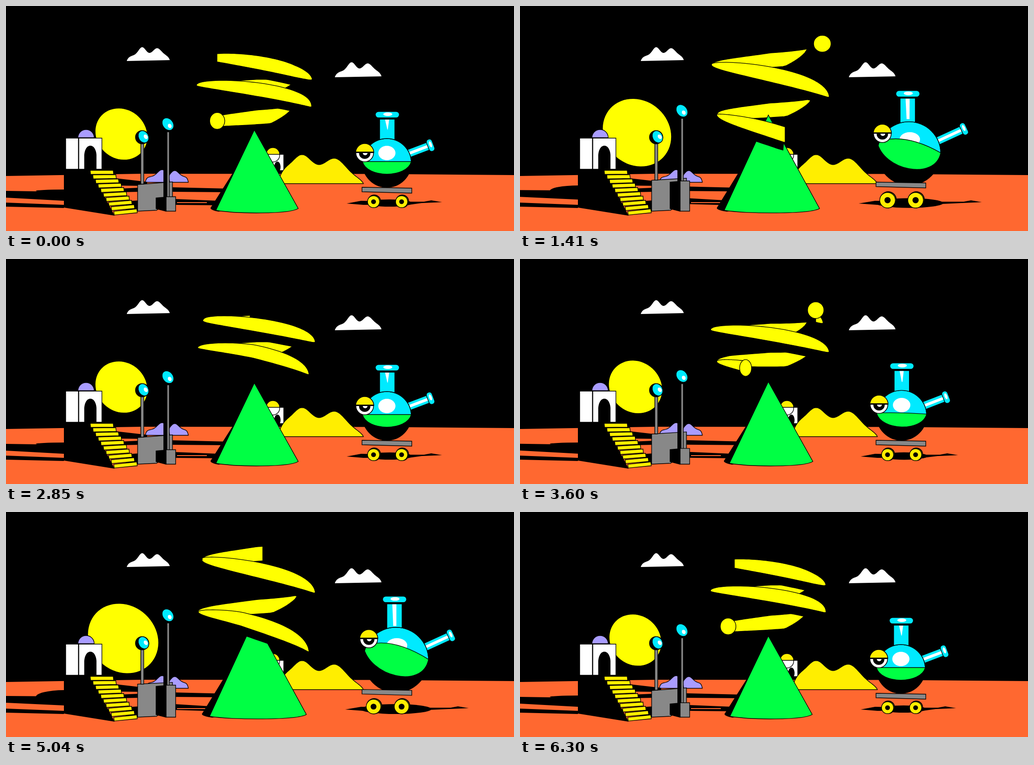
An HTML page with a canvas that plays this animation: 1123 px wide and 499 px high, repeating every 6.33 s.

```html
<!DOCTYPE html>
<html lang="en">
<head>
<meta charset="utf-8">
<title>Desert toys</title>
<style>
html, body { margin: 0; width: 100%; height: 100%; overflow: hidden; background: #000; }
canvas { display: block; }
</style>
</head>
<body>
<canvas id="stage" width="1123" height="499"></canvas>
<script>
const ctx = document.getElementById('stage').getContext('2d');
const LOOP = 6330;
const SUN = '#ffff00', GOLD = '#ffee00', CYAN = '#00eaff', GREEN = '#00ff44';
const ORANGE = '#ff6830', LILAC = '#a99cff', GREY = '#888', WHITE = '#fff', BLACK = '#000';

const clamp = (v, a = 0, b = 1) => Math.min(b, Math.max(a, v));
const rad = d => d * Math.PI / 180;
const gauss = (x, c, w) => Math.exp(-((x - c) ** 2) / (2 * w * w));
const ease = (t, a, b) => {
  const u = clamp((t - a) / (b - a));
  return u * u * (3 - 2 * u);
};
// Rises from a to b, holds until c, falls until d
const swing = (t, a, b, c, d) => ease(t, a, b) * (1 - ease(t, c, d));

function pose(t) {
  const s = .7 * swing(t, 0, 320, 380, 760) + swing(t, 450, 1650, 1700, 2250) + swing(t, 3400, 4600, 5060, 6130);
  const wheel = swing(t, 300, 700, 800, 2100) + .4 * swing(t, 4100, 5040, 5100, 6000);
  const hop = swing(t, 400, 750, 800, 1700) + swing(t, 3400, 4100, 4180, 5640);
  return {
    s, wheel, hop,
    angle: 43 - 1080 * t / LOOP + 30 * gauss(t, 1410, 260),
    cx: 842 + 20 * s,
    cy: 348 - 17 * s - 20 * wheel * wheel,
    reach: clamp(s + wheel) + .8 * gauss(t, 380, 110)
  };
}

function paint(fill, line = 1.4) {
  ctx.fillStyle = fill;
  ctx.fill();
  if (line) {
    ctx.strokeStyle = BLACK;
    ctx.lineWidth = line;
    ctx.stroke();
  }
}

function poly(fill, pts, line) {
  ctx.beginPath();
  pts.forEach(([x, y]) => ctx.lineTo(x, y));
  ctx.closePath();
  paint(fill, line);
}

function box(fill, x, y, w, h, line) {
  ctx.beginPath();
  ctx.rect(x, y, w, h);
  paint(fill, line);
}

function oval(fill, x, y, rx, ry = rx, turn = 0, line) {
  ctx.beginPath();
  ctx.ellipse(x, y, rx, ry, turn, 0, Math.PI * 2);
  paint(fill, line);
}

function dome(fill, x, y, r, line) {
  ctx.beginPath();
  ctx.arc(x, y, r, Math.PI, 0);
  ctx.closePath();
  paint(fill, line);
}

// A flat-bottomed mound with rounded ends and some peaks [centre, spread, height]
function mound(fill, x, y, w, flat, peaks, line, rise = 0) {
  const pts = [];
  for (let i = 0; i <= 80; i++) {
    const u = -Math.cos(Math.PI * i / 80), px = (u + 1) / 2 * w;
    const edge = 1 - u ** 8;
    const h = peaks.reduce((sum, [c, spread, tall]) => sum + tall * gauss(px, c, spread), flat);
    pts.push([x + px, y - rise * px / w - h * edge ** .8]);
  }
  poly(fill, pts, line);
}

function cloud(x, y, w) {
  const k = w / 95;
  mound(WHITE, x, y, w, 12 * k, [[34 * k, 8 * k, 18 * k], [67 * k, 9 * k, 15 * k]], 0, 2);
}

function backdrop({ s }) {
  ctx.fillStyle = BLACK;
  ctx.fillRect(0, 0, 1123, 499);
  poly(ORANGE, [[0, 377], [300, 372], [820, 372.5], [1123, 375], [1123, 499], [0, 499]], 0);
  cloud(267, 122, 95);
  cloud(727, 158, 103);
  oval(SUN, 255 + 4 * s, 284 - 3.5 * s, 60 + 22 * s, 54 + 18.5 * s, .75, 0);

  box(WHITE, 578, 329, 36, 36);
  oval(BLACK, 600, 357, 7, 12, 0, 0);
  oval(WHITE, 590, 331, 15);
  dome(GOLD, 590, 329, 15);
  mound(GOLD, 600, 394, 190, 14, [[10, 14, 16], [54, 23, 50], [126, 24, 42]]);
  mound(LILAC, 356, 391, 47, 12, [[17, 9, 14]]);
  mound(LILAC, 308, 391, 54, 12, [[37, 10, 16]]);
}

function groundShadows({ s }) {
  const band = (x0, y0, x1, y1, h0, h1) =>
    poly(BLACK, [[x0, y0], [x1, y1], [x1, y1 + h1], [x0, y0 + h0]], 0);
  band(0, 410 - 2 * s, 128, 412 - 3 * s, 15, 20);
  band(0, 436, 128, 441, 9, 7);
  oval(BLACK, 128, 410, 62, 3 + 30 * Math.max(0, s - .6), 0, 0);
  band(225, 380, 312, 390, 18, 9);
  band(250, 405, 295, 403, 8, 9);
  band(265, 433, 295, 431, 20, 24);
  band(366, 402 - 2 * s, 490, 405 - 2 * s, 10, 8);
  band(372, 428 - 2 * s, 470, 432, 13, 10);
  ctx.fillStyle = ORANGE;
  ctx.fillRect(378, 435, 66, 2);
}

function temple() {
  dome(LILAC, 177, 292, 18);
  poly(BLACK, [[128, 361], [186, 361], [240, 465], [128, 447]], 0);
  box(WHITE, 132, 293, 28, 69);
  box(WHITE, 161, 293, 51, 69);
  ctx.beginPath();
  ctx.moveTo(173, 362);
  ctx.lineTo(173, 330);
  ctx.bezierCurveTo(175, 303, 198, 303, 200, 330);
  ctx.lineTo(200, 362);
  paint(BLACK, 0);
  for (let i = 0; i < 10; i++) {
    const x = 186 + i * 5.8, y = 364.5 + i * 9.8, lean = i * .3;
    poly(GOLD, [[x, y + lean], [x + 51, y - lean], [x + 52, y + 8.5 - lean], [x + 1, y + 9 + lean * .7]]);
  }
}

function lamps({ s, hop }) {
  const b = 393 - 36 * hop, tilt = 3 * (1 - clamp(hop));
  const t = 423 - 39 * s, y = 262 - 33 * s;
  poly(GREY, [[291, b + tilt], [368, b - tilt], [368, 424], [333, 453], [291, 455]]);
  box(BLACK, 348, Math.min(b, 363), 13, 80, 0);
  box(GREY, 298, 304, 6.5, b - 302);
  oval(BLACK, 301, 291, 15.5, 15.5, 0, 0);
  oval(CYAN, 304, 290, 11, 14, -.5);
  oval(WHITE, 309, 290, 4, 5.5, -.6, 0);

  box(GREY, 356, y + 17, 5, t - y - 16);
  oval(CYAN, 358, y, 11.5, 15, -.65);
  oval(WHITE, 362, y + 4, 4, 5, -.5, 0);
  box(GREY, 354, t, 21, 455 - t);
  poly(BLACK, [[331, t + 2], [354, t], [354, 456], [331, 450]], 0);
}

function makeCoil({ s, angle }) {
  const first = ((angle + 1260) % 360) - 180;
  const last = first + 634;
  const top = 123 - 50 * s, pitch = 60 + 57 * s;

  const point = a => {
    const u = a - first, sin = Math.sin(rad(a)), cos = Math.cos(rad(a));
    const size = 132 - Math.min(14, 14 * ((u - 305) / 211) ** 4);
    const y = top + pitch * u / 360 + 10 * (1 - cos) - 12 * sin - 4 * Math.abs(sin);
    return [553 - size * cos, y + 14 * clamp((u - 530) / 100)];
  };

  // Lit edges of the tube at angle a, q degrees into its half turn
  const edges = (a, q, front) => {
    const [x, y] = point(a);
    if (front) {
      const h = (15.5 + 2 * s) * Math.max(0, Math.sin(Math.PI * clamp(q / 172) ** 1.4)) ** .65;
      return [x, y - h, y + h];
    }
    const up = y - 16 * clamp((180 - q) / 90);
    const low = y + 16 * Math.sqrt(clamp((180 - q) / 35));
    return [x, up, up + (low - up) * clamp((q - 46) / 28) ** .7];
  };

  const strand = (base, front) => {
    const a0 = Math.max(first, base + (front ? 0 : 46));
    const a1 = Math.min(last, base + (front ? 172 : 180));
    if (a1 <= a0) return;
    const up = [], low = [], dark = [], n = 40;
    for (let i = 0; i <= n; i++) {
      const a = a0 + (a1 - a0) * i / n, q = a - base;
      const [x, y, z] = edges(a, q, front);
      up.push([x, y]);
      low.unshift([x, z]);
      dark.unshift([x - 4, z + 18 * clamp(q / 15) * clamp((180 - q) / 30)]);
    }
    if (front) poly(BLACK, up.concat(dark), 0);
    poly(SUN, up.concat(low), 1.3);
  };

  const cap = (a, side, lift, front) => {
    const c = Math.cos(rad(a)) * side;
    if (c < .35 || (Math.sin(rad(a)) > 0) !== front) return;
    const [x, y] = point(a);
    oval(SUN, x, y + lift, 19.5 * Math.sqrt(c), 18.5);
  };

  return front => {
    for (let base = -360; base <= 720; base += 360) strand(base + (front ? 0 : 180), front);
    cap(first, -1, -16, front);
    cap(last, 1, 4, front);
  };
}

function cone({ s }) {
  const top = 275 - 37 * s, l = 464 - 14 * s, r = 646 + 18 * s;
  ctx.beginPath();
  ctx.moveTo(549, top + 20);
  ctx.lineTo(452 - 19 * s, 448);
  ctx.quadraticCurveTo(453 - 19 * s, 453, l + 6, 456);
  ctx.lineTo(549, 440);
  paint(BLACK, 0);
  ctx.beginPath();
  ctx.moveTo(549, top);
  ctx.lineTo(l, 453);
  ctx.bezierCurveTo(l + 45, 461, r - 20, 462, r, 449);
  ctx.closePath();
  paint(GREEN);
}

function spout(x0, y0, x1, y1) {
  const len = Math.hypot(x1 - x0, y1 - y0);
  ctx.save();
  ctx.translate(x0, y0);
  ctx.rotate(Math.atan2(y1 - y0, x1 - x0));
  box(CYAN, -8, -9, len + 6, 18);
  box(WHITE, 3, -3, len - 9, 6, 0);
  ctx.beginPath();
  ctx.roundRect(len - 6, -14, 13, 28, 6);
  paint(CYAN);
  oval(WHITE, len + 1, -2, 3, 7, 0, 0);
  ctx.restore();
}

function neck(x, base, height, s) {
  const y = base - height;
  box(CYAN, x - 17, y, 33.5, height + 9);
  poly(WHITE, [[x - 5, y + 1], [x + 4, y + 1], [x + 1 + 3 * s, y + 23 + 26 * s], [x - 3 * s, y + 23 + 26 * s]], 0);
  ctx.beginPath();
  ctx.roundRect(x - 26.5, y - 17, 53, 14, 7);
  paint(CYAN);
  oval(WHITE, x + 1, y - 11, 10, 4, 0, 0);
}

function eye(x, y) {
  oval(WHITE, x, y, 19.5, 19.5, 0, 1.6);
  oval(BLACK, x, y + 1, 12.5, 12, 0, 0);
  oval(WHITE, x + 1, y - 1, 5.5, 6, 0, 0);
  dome(GOLD, x, y - 1, 20, 1.6);
  box(BLACK, x - 19, y - 3, 38, 3, 0);
}

function body({ s, wheel, cx, cy }, r) {
  const x0 = cx - r, x1 = cx + r;
  const yl = cy - 3 - 32 * s + 12 * wheel, yr = cy - 3 + 2 * s;
  const mid = (yl + yr) / 2, drop = (cy + 25 + 10 * s - mid) * 4 / 3;
  const floor = () => ctx.bezierCurveTo(x1 - r * .18, yr + drop, x0 + r * .18, yl + drop, x0, yl);

  oval(BLACK, cx, cy, r, r, 0, 0);
  ctx.save();
  ctx.beginPath();
  ctx.arc(cx, cy, r - .7, 0, Math.PI * 2);
  ctx.clip();
  ctx.beginPath();
  ctx.moveTo(x0, yl);
  ctx.lineTo(x0, cy - r);
  ctx.lineTo(x1, cy - r);
  ctx.lineTo(x1, yr);
  floor();
  paint(CYAN, 0);
  oval(WHITE, cx + 2 * s, cy - 22 - 10 * s, 19 + 4 * s, 16, 0, 0);
  ctx.beginPath();
  ctx.moveTo(x0, yl);
  ctx.quadraticCurveTo(cx - 12 * s, mid - 38 * s, x1, yr);
  floor();
  paint(GREEN);
  ctx.restore();
  ctx.beginPath();
  ctx.arc(cx, cy, r, 0, Math.PI * 2);
  ctx.strokeStyle = BLACK;
  ctx.lineWidth = 1.4;
  ctx.stroke();
}

function cart({ wheel }) {
  const plate = 403 - 21 * wheel, r = 13.3 + 7.2 * wheel;
  poly(GREY, [[787, plate - 1], [897, plate + 1], [897, plate + 12], [787, plate + 9]]);
  for (const x of [812.5, 874.5]) {
    const y = 434 - 6 * wheel;
    oval(BLACK, x + 1.5, y - 1, r + 1.5, r + 1.5, 0, 0);
    oval(GOLD, x + 1.5, y - 1, r);
    oval(GOLD, x, y, r);
    oval(BLACK, x, y, r * .4, r * .4, 0, 0);
  }
}

function flask(p) {
  const { s, wheel, cx, cy, reach } = p;
  const r = 54 + 18 * s;
  const tipX = cx + 96 + 25 * reach, tipY = cy - 39 - 15 * reach;
  const end = tipX + 26 + 14 * reach;
  poly(BLACK, [[753 - 8 * wheel, 438], [785, 432], [880, 434], [end - 40, 434], [end - 24, 431],
    [end, 435], [end - 45, 437], [890, 441], [790, 441]], 0);
  oval(BLACK, 848 + 14 * s, 437, 50 + 28 * s, 8 + 3 * s, 0, 0);

  spout(cx + r * .88, cy - r * .38, tipX, tipY);
  neck(cx + 1 - 4 * s, cy - r, 43 + 9 * clamp(s * 1.4), s);
  body(p, r);
  eye(cx - 49 - 11 * s, cy - 22 - 24 * s);
  cart(p);
}

function draw(t) {
  const p = pose(t), coil = makeCoil(p);
  backdrop(p);
  groundShadows(p);
  temple();
  lamps(p);
  coil(false);
  cone(p);
  coil(true);
  flask(p);
}

const begin = performance.now();
function tick() {
  draw((performance.now() - begin) % LOOP);
  requestAnimationFrame(tick);
}
tick();
</script>
</body>
</html>
```
